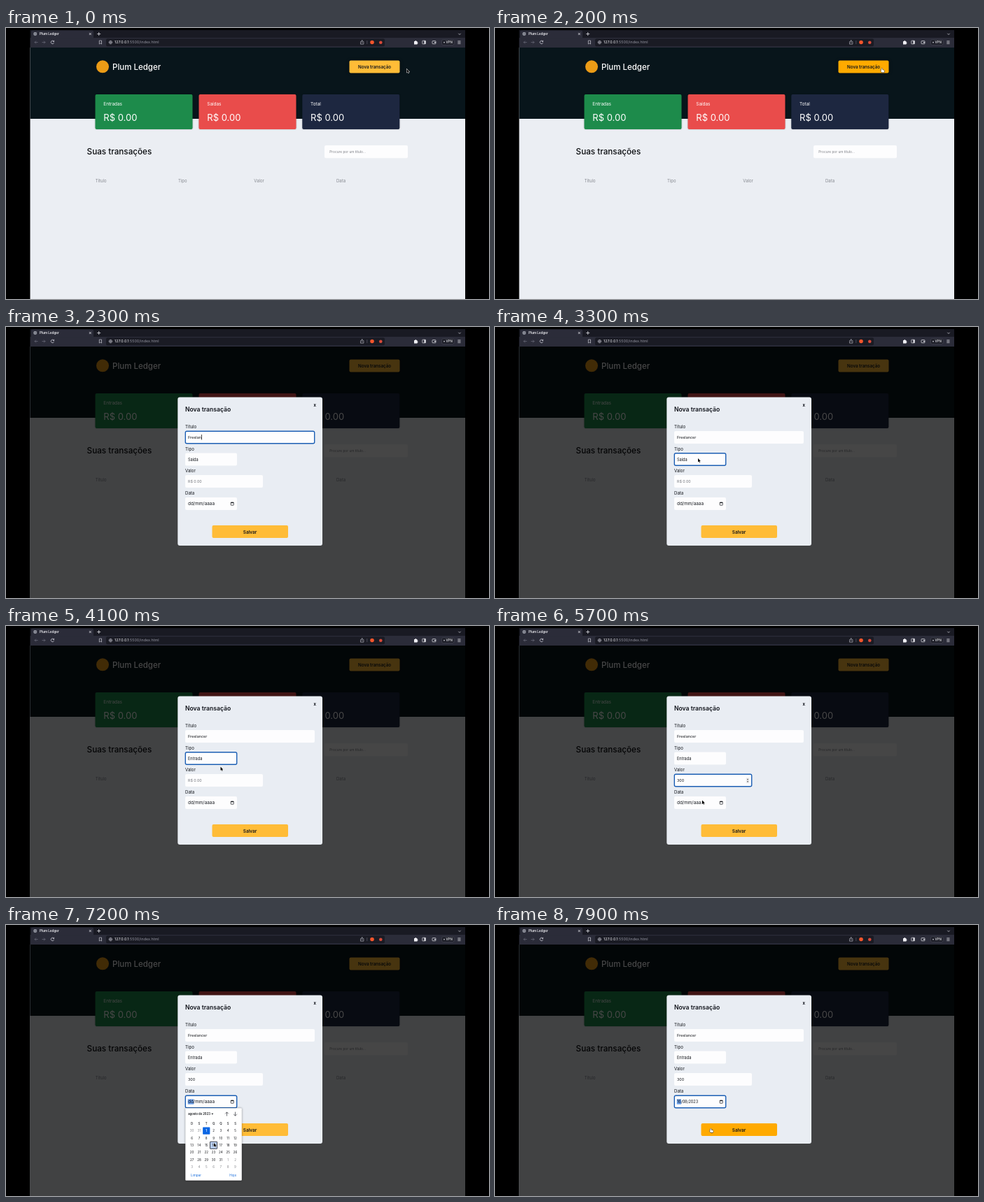
These frames come from a looping animation (690x388 px, 8 s). An HTML page with a canvas:

```html
<!DOCTYPE html>
<html lang="pt-BR">
<head>
<meta charset="utf-8">
<title>Plum Ledger</title>
<style>
  html, body { margin: 0; width: 100%; height: 100%; overflow: hidden; background: #000; }
  canvas { display: block; width: 690px; height: 388px; }
</style>
</head>
<body>
<canvas id="stage"></canvas>
<script>
const LOOP = 8000, STEP = 100;
const APP = 'Plum Ledger';
const canvas = document.getElementById('stage');
const ctx = canvas.getContext('2d');
const ratio = window.devicePixelRatio || 1;
canvas.width = 690 * ratio;
canvas.height = 388 * ratio;

const YELLOW = '#ffbc37', HOVER = '#ffaa00', RING = '#1c5fb4';
const ADD = [490.5, 46.5, 72, 18];
const SAVE = [294.5, 284, 108.5, 18];
const FIELDS = {
  title: [256, 149, 185, 18],
  kind: [256, 180.5, 74, 18],
  value: [256, 212, 111, 18],
  date: [256, 244, 74, 18]
};

// Pointer stops: time, x, y
const PATH = [
  [0, 572.5, 58.5], [200, 552.5, 58], [400, 552.5, 58], [1000, 300, 157],
  [3000, 300, 157], [3300, 290, 188], [3900, 290, 188], [4100, 306.5, 201.5],
  [4400, 301, 221], [5100, 301, 221], [5700, 296, 249.5], [6200, 322, 252],
  [6600, 322, 252], [7200, 297, 312], [7500, 297, 312], [7900, 308, 291.5]
];

// The last entry whose time has been reached
const at = (t, entries) => entries.reduce((found, [start, v]) => t >= start ? v : found, '');
const inside = (p, [x, y, w, h]) => p.x >= x && p.x <= x + w && p.y >= y && p.y <= y + h;

function pointerAt(t) {
  const i = PATH.findIndex(stop => stop[0] > t);
  if (i < 0) return { x: PATH[PATH.length - 1][1], y: PATH[PATH.length - 1][2] };
  const [t0, x0, y0] = PATH[i - 1], [t1, x1, y1] = PATH[i];
  const k = (t - t0) / (t1 - t0), e = k * k * (3 - 2 * k);
  return { x: x0 + (x1 - x0) * e, y: y0 + (y1 - y0) * e };
}

function box([x, y, w, h], fill, radius = 0, stroke, width = 1) {
  ctx.beginPath();
  ctx.roundRect(x, y, w, h, radius);
  if (fill) { ctx.fillStyle = fill; ctx.fill(); }
  if (stroke) { ctx.strokeStyle = stroke; ctx.lineWidth = width; ctx.stroke(); }
}

function disc(x, y, r, fill) {
  ctx.beginPath();
  ctx.arc(x, y, r, 0, Math.PI * 2);
  ctx.fillStyle = fill;
  ctx.fill();
}

function lines(path, color, width = 0.8) {
  ctx.strokeStyle = color;
  ctx.lineWidth = width;
  ctx.stroke(new Path2D(path));
}

function shape(path, fill) {
  ctx.fillStyle = fill;
  ctx.fill(new Path2D(path));
}

// y is the middle of the capitals; returns the right edge of left-aligned text
function text(str, x, y, size, color, weight = 400, align = 'left') {
  ctx.font = `${weight} ${size}px Inter, "Open Sans", sans-serif`;
  ctx.textAlign = align;
  ctx.fillStyle = color;
  ctx.fillText(str, x, y + size * 0.36);
  return x + ctx.measureText(str).width;
}

function shadow(blur, color, draw) {
  ctx.save();
  ctx.shadowBlur = blur * ratio;
  ctx.shadowColor = color;
  draw();
  ctx.restore();
}

function drawBrowser() {
  const icon = '#c9cad3', faint = '#666776';
  box([34.5, 3, 621.5, 11], '#191a23');
  box([34.5, 14, 621.5, 14], '#2b2c39');
  box([36, 3.5, 89, 12], '#2b2c39', 2);
  disc(41.7, 8.5, 2.4, '#aeb1bb');
  lines('M39.5 8.5H44M41.7 6.2V10.8', '#4a4c58', 0.6);
  text(APP, 48, 8.5, 4.6, '#f0f0f4', 600);
  lines('M118.8 7l3 3m0-3l-3 3M130.2 8.5h5M132.7 6v5', '#e2e2e8');
  lines('M646.3 7.8l1.7 1.7 1.7-1.7', icon);

  lines('M45.5 20.5h-4.5m2-2l-2 2 2 2M51.5 20.5H56m-2-2l2 2-2 2', faint);
  lines('M68.3 19.2a2.2 2.2 0 1 0 .2 2M68.6 17.8v1.8h-1.8', icon);
  lines('M133.3 18h3.2v5l-1.6-1.3-1.6 1.3z', icon, 0.7);
  box([143, 15.2, 398, 11], '#1a1b24', 2);
  lines('M151.6 20.5a2.2 2.2 0 1 0-4.4 0 2.2 2.2 0 1 0 4.4 0M147.2 20.5h4.4M149.4 18.3v4.4', icon, 0.6);
  const end = text('127.0.0.1', 155, 20.5, 5.4, '#f0f0f4');
  text(':5500/index.html', end, 20.5, 5.4, '#92939f');
  lines('M507.5 19.5h-1v3.6h4.4v-3.6h-1M508.7 21.5v-4m-1.2 1.2l1.2-1.2 1.2 1.2', icon, 0.6);
  lines('M515.8 18v5', faint, 0.6);
  disc(523, 20.5, 2.8, '#f4552c');
  disc(535.3, 20.7, 2.3, '#d84a3a');
  shape('M583 19h1.3a1 1 0 1 1 2 0h1.2v1.4a1 1 0 1 1 0 2v1h-4.5z', '#f0f0f4');
  box([594.8, 18.2, 4.6, 4.6], null, 0.5, '#e2e2e8', 0.7);
  box([597.4, 18.2, 2, 4.6], '#e2e2e8');
  box([609, 18.5, 5, 4.2], null, 0.8, '#e2e2e8', 0.7);
  box([611.8, 20, 2.2, 1.3], '#e2e2e8');
  box([622.5, 16.7, 17.5, 7.8], '#1f202a', 2, '#50515f', 0.5);
  disc(626, 20.6, 0.9, icon);
  text('VPN', 628.5, 20.6, 4.4, '#f0f0f4', 500);
  lines('M645.3 18.8h4.2m-4.2 1.8h4.2m-4.2 1.8h4.2', '#e2e2e8', 0.7);
}

function drawCard(x, color, label) {
  shadow(2, 'rgba(0,0,0,.3)', () => box([x, 95, 139, 50], color, 2));
  text(label, x + 11.8, 108.5, 6.4, '#fff');
  text('R$ 0.00', x + 11.8, 128.2, 13, '#fff');
}

function drawPage(addHover) {
  box([34.5, 28, 621.5, 360], '#ebeef3');
  box([34.5, 28, 621.5, 102], '#08151b');
  disc(138, 55.3, 9, '#eb9b16');
  text(APP, 152, 55.5, 11.5, '#fff', 500);
  shadow(4, 'rgba(0,0,0,.5)', () => box(ADD, addHover ? HOVER : YELLOW, 2));
  text('Nova transação', 526.5, 55.5, 6.2, '#10151b', 600, 'center');

  drawCard(127.5, '#1d8b4b', 'Entradas');
  drawCard(275.5, '#e94c4b', 'Saídas');
  drawCard(423.3, '#1d2740', 'Total');

  text('Suas transações', 115.6, 177, 11.7, '#0b0d10', 500);
  box([455, 168, 119, 18.3], '#fdfdfe', 2);
  text('Procure por um título...', 462.3, 177.2, 4.8, '#7c7e85');
  [['Título', 127.7], ['Tipo', 246], ['Valor', 354.3], ['Data', 472]]
    .forEach(([label, x]) => text(label, x, 218.7, 6, '#85888f'));
}

function drawField(name, label, focus) {
  const [x, y, w, h] = FIELDS[name];
  text(label, x, y - 6, 6.1, '#111419');
  box([x, y, w, h], '#fdfdfe', 2);
  if (focus === name) box([x + 0.3, y + 0.3, w - 0.6, h - 0.6], null, 2, RING, 1.4);
}

function drawEntry(value, placeholder, y, size, caret) {
  const dark = '#15181d';
  const end = value ? text(value, 260, y, 5.45, dark) : 260;
  if (!value) text(placeholder, 260, y, size, '#75777d');
  if (caret) box([end + 0.1, y - 3.7, 0.7, 7.4], '#000');
}

function drawDate(t, focused) {
  const done = t >= 7300, size = done ? 5.5 : 6.4;
  const [day, rest] = done ? ['16', '/08/2023'] : ['dd', '/mm/aaaa'];
  ctx.font = `400 ${size}px Inter, "Open Sans", sans-serif`;
  const width = ctx.measureText(day).width;
  if (focused) box([259.7, 249.3, width + 0.6, 7.4], '#6ea3ee');
  text(day, 260, 253, size, '#15181d');
  text(rest, 260 + width, 253, size, '#15181d');
  box([321.2, 251.3, 4, 3.9], null, 0.4, '#15181d', 0.7);
  box([321.2, 250.8, 4, 1.3], '#15181d');
}

function drawModal(t, pointer) {
  const focus = at(t, [[1100, 'title'], [3300, 'kind'], [4500, 'value'], [6200, 'date']]);
  const title = at(t, [[1800, 'F'], [1900, 'Fr'], [2000, 'Free'], [2100, 'Freel'],
    [2300, 'Freelan'], [2400, 'Freelanc'], [2500, 'Freelancer']]);
  const value = at(t, [[5100, '3'], [5200, '30'], [5400, '300']]);
  const caretOn = t < 1300 || t >= 1600 && t < 2800 || t >= 4500 && t < 4800 || t >= 5100 && t < 5400;

  box([34.5, 28, 621.5, 360], 'rgba(0,0,0,.72)');
  box([245.3, 100.5, 206.7, 212.5], '#e9edf3', 3);
  text('Nova transação', 256, 118, 8.6, '#10131a', 600);
  text('x', 441.2, 111.8, 6, '#10131a', 700, 'center');

  drawField('title', 'Título', focus);
  drawField('kind', 'Tipo', focus);
  drawField('value', 'Valor', focus);
  drawField('date', 'Data', focus);
  drawEntry(title, 'Digite um nome para a sua transação', 157.8, 5.6, focus === 'title' && caretOn);
  text(t < 3700 ? 'Saída' : 'Entrada', 260, 189.7, 5.6, '#15181d');
  drawEntry(value, 'R$ 0.00', 221.3, 5.3, focus === 'value' && caretOn);
  if (focus === 'value') {
    box([358.7, 217, 4.6, 8.2], '#eeeeef', 0.6);
    shape('M359.8 220.2l1.2-1.7 1.2 1.7zM359.8 222.3l1.2 1.7 1.2-1.7z', '#4c4c50');
  }
  drawDate(t, focus === 'date');

  box(SAVE, inside(pointer, SAVE) && t >= 7500 ? HOVER : YELLOW, 2);
  text('Salvar', 348.5, 293.2, 6.4, '#10131a', 600, 'center');
}

function drawCalendar(t, pointer) {
  const blue = '#1a6fdc', dark = '#16181c';
  shadow(3, 'rgba(0,0,0,.45)', () => box([256.3, 262.3, 80.5, 103.4], '#fff', 1));
  text('agosto de 2023', 260.2, 270.5, 4.2, dark, 600);
  shape('M293.3 269.7h3l-1.5 1.8z', dark);
  lines('M315.5 273.5v-5.6m-2.4 2.4l2.4-2.4 2.4 2.4M327.5 267.6v5.6m-2.4-2.4l2.4 2.4 2.4-2.4', '#303238', 0.7);

  const column = i => 265.6 + 10.32 * i;
  [...'DSTQQSS'].forEach((d, i) => text(d, column(i), 284, 4.3, dark, 500, 'center'));
  for (let i = 0; i < 42; i++) {
    const x = column(i % 7), y = 294.6 + 10.35 * Math.floor(i / 7), day = i - 1;
    const cell = [x - 5.1, y - 5.1, 10.2, 10.2];
    const outer = day < 1 || day > 31;
    const label = day < 1 ? day + 31 : day > 31 ? day - 31 : day;
    if (day === 1) box(cell, '#0b66e4', 0.6);
    else if (inside(pointer, cell)) box(cell, '#b6cdf2', 0.6, t >= 7200 ? '#20242c' : null, 0.8);
    text(label, x, y, 4.5, day === 1 ? '#fff' : outer ? '#85878c' : dark, day === 1 ? 600 : 400, 'center');
  }
  text('Limpar', 264, 358, 4.6, blue);
  text('Hoje', 319.2, 358, 4.6, blue);
}

function drawPointer(kind, { x, y }) {
  ctx.save();
  ctx.translate(x, y);
  if (kind === 'beam') {
    lines('M-1.3-3.6q1.3 0 1.3 1V2.6q0 1-1.3 1M1.3-3.6Q0-3.6 0-2.6V2.6q0 1 1.3 1', '#222', 0.7);
  } else {
    const path = kind === 'hand'
      ? 'M0 0q.7-.5 1 .3v1.6l2.3.6q.7.3.5 1.2L3.3 5.6H.2L-1.5 3.4q0-.9 1.1-.4L-.4.4z'
      : 'M0 0V5.4L1.3 4.3 2.1 6.2 3 5.8 2.2 3.9H3.8z';
    ctx.lineJoin = 'round';
    lines(path, kind === 'hand' ? '#222' : '#fff', 1);
    shape(path, kind === 'hand' ? '#fff' : '#000');
  }
  ctx.restore();
}

function draw(t) {
  const pointer = pointerAt(t);
  const modal = t >= 400, calendar = t >= 6300 && t < 7300;
  const addHover = !modal && inside(pointer, ADD);

  ctx.setTransform(ratio, 0, 0, ratio, 0, 0);
  box([0, 0, 690, 388], '#000');
  drawBrowser();
  drawPage(addHover);
  if (modal) drawModal(t, pointer);
  if (calendar) drawCalendar(t, pointer);

  const hidden = t >= 1800 && t < 3000 || t >= 5100 && t < 5700;
  if (hidden) return;
  const overText = modal && (inside(pointer, FIELDS.title) || inside(pointer, FIELDS.value));
  const overButton = addHover || t >= 7500 && inside(pointer, SAVE);
  drawPointer(overText ? 'beam' : overButton ? 'hand' : 'arrow', pointer);
}

const start = performance.now();
function tick() {
  const elapsed = (performance.now() - start) % LOOP;
  draw(Math.floor(elapsed / STEP) * STEP);
  requestAnimationFrame(tick);
}
tick();
</script>
</body>
</html>
```
